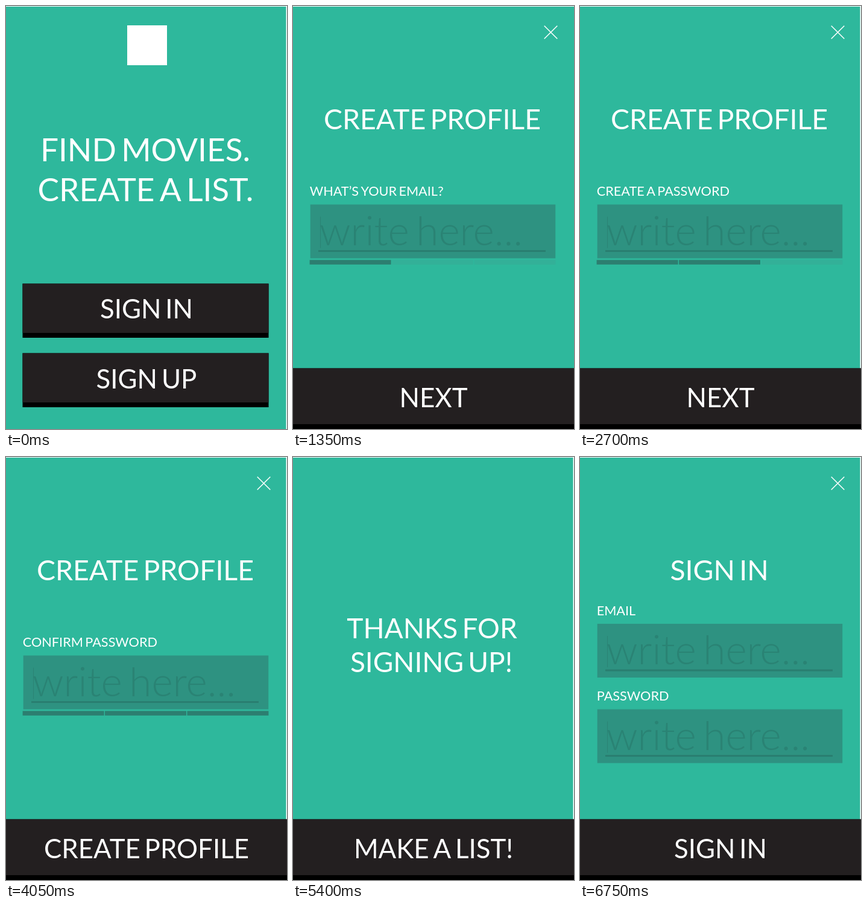
Animation of 466x700 px, one loop 8 s. Source, as an HTML page with a canvas:

```html
<!DOCTYPE html>
<html lang="en">
<head>
<meta charset="utf-8">
<title>Movie list sign-up</title>
<style>
  html, body { margin: 0; width: 100%; height: 100%; overflow: hidden; background: #fff; }
  canvas { display: block; width: 466px; height: 700px; }
</style>
</head>
<body>
<canvas id="stage" width="466" height="700"></canvas>
<script>
const ctx = document.getElementById('stage').getContext('2d');

const LOOP = 8000;
const SCREEN_TIME = 1350;
const WORD_SPACING = -0.1; // em
const color = {
  teal: '#2eb89c', field: '#2e9281', hint: '#2a8374', line: '#297e70',
  step: '#2c7e70', stepOff: '#33b098', dark: '#231f20', white: '#fff'
};
const size = { hero: 53.2, title: 46.4, thanks: 46, button: 43.8, label: 21.7, hint: 67.5 };

function rect(x, y, w, h, fill) {
  ctx.fillStyle = fill;
  ctx.fillRect(x, y, w, h);
}

function text(string, x, baseline, px, align = 'center', fill = color.white, weight = 400) {
  ctx.font = `${weight} ${px}px Lato, sans-serif`;
  ctx.wordSpacing = `${px * WORD_SPACING}px`;
  ctx.textAlign = align;
  ctx.fillStyle = fill;
  ctx.fillText(string, x, baseline);
}

function background(width = 464.5) {
  rect(0, 0, 466, 700, color.white);
  rect(0, 1, width, 699, color.teal);
}

function button(label, x, y, w, faceHeight, baseline) {
  rect(x, y, w, faceHeight + 8, '#000');
  rect(x, y, w, faceHeight, color.dark);
  text(label, 233, baseline, size.button);
}

function bottomButton(label) {
  button(label, 0, 599.5, 466, 92.5, 664);
}

function closeIcon() {
  ctx.strokeStyle = color.white;
  ctx.lineWidth = 1.5;
  ctx.beginPath();
  ctx.moveTo(416.7, 32.7);
  ctx.lineTo(438.3, 54.3);
  ctx.moveTo(438.3, 32.7);
  ctx.lineTo(416.7, 54.3);
  ctx.stroke();
}

function title(label) {
  text(label, 231, 204.4, size.title);
}

function field(label, y) {
  text(label, 27.7, y - 14.4, size.label, 'left');
  rect(28.7, y, 406.5, 89, color.field);
  rect(45, y + 20, 1, 52, color.hint);
  text('write here...', 44, y + 67, size.hint, 'left', color.hint, 300);
  rect(42, y + 75.5, 377, 3, color.line);
}

function steps(done) {
  for (let i = 0; i < 3; i++) {
    rect(27.6 + i * 136.4, 420.3, 135, 7.5, i < done ? color.step : color.stepOff);
  }
}

function welcome() {
  background();
  rect(201, 32, 66, 66, color.white);
  text('FIND MOVIES.', 231, 256.7, size.hero);
  text('CREATE A LIST.', 231.5, 322.5, size.hero);
  button('SIGN IN', 27.5, 459.5, 408, 81.5, 517.3);
  button('SIGN UP', 27.5, 574.5, 408, 81.5, 632.8);
}

function profile(label, step, action, width) {
  background(width);
  closeIcon();
  title('CREATE PROFILE');
  field(label, 328.5);
  steps(step);
  bottomButton(action);
}

function thanks() {
  background();
  text('THANKS FOR', 230.5, 300.3, size.thanks);
  text('SIGNING UP!', 229.5, 355.5, size.thanks);
  bottomButton('MAKE A LIST!');
}

function signIn() {
  background();
  closeIcon();
  title('SIGN IN');
  field('EMAIL', 276);
  field('PASSWORD', 417.5);
  bottomButton('SIGN IN');
}

const screens = [
  welcome,
  () => profile('WHAT’S YOUR EMAIL?', 1, 'NEXT', 466),
  () => profile('CREATE A PASSWORD', 2, 'NEXT'),
  () => profile('CONFIRM PASSWORD', 3, 'CREATE PROFILE'),
  thanks,
  signIn
];

const start = performance.now();

function draw(now) {
  const time = Math.max(0, now - start) % LOOP;
  screens[Math.floor(time / SCREEN_TIME)]();
  requestAnimationFrame(draw);
}

draw(start);
</script>
</body>
</html>
```
